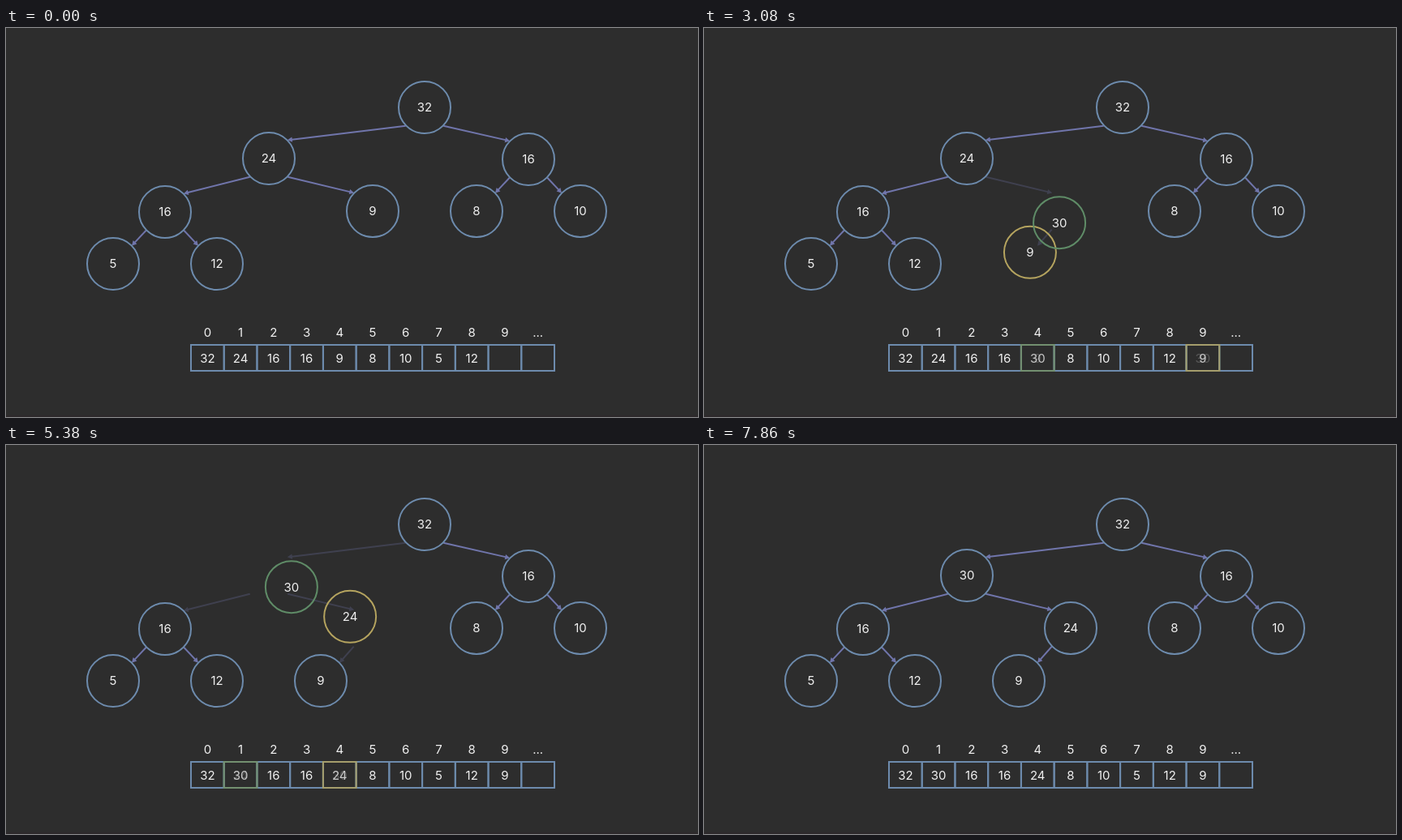
An HTML page that plays this animation: 853x480 px, repeating every 8590 ms.

```html
<!DOCTYPE html>
<html lang="en">
<head>
<meta charset="utf-8">
<title>Heap insertion</title>
<style>
  html, body { margin: 0; width: 100%; height: 100%; overflow: hidden; background: #2d2d2d; }
  svg { display: block; width: 853px; height: 480px; }
  text { font: 400 15px Inter, "Liberation Sans", sans-serif; fill: #f0f0f0; text-anchor: middle; }
  circle, rect { fill: none; stroke-width: 2; }
  .ask { word-spacing: -1.6px; }
  .arrow { stroke: #7075ab; stroke-width: 2; fill: #7075ab; }
  .arrow path { stroke: none; }
</style>
</head>
<body>
<svg id="stage" viewBox="0 0 853 480"></svg>
<script>
const LOOP = 8590, FRAME = 60;
const BLUE = '#6d8bad', GREEN = '#5f8c67', YELLOW = '#b5a45f';
const values = [32, 24, 16, 16, 9, 8, 10, 5, 12, 30];
const slots = [[516, 98], [324, 161], [644, 162], [196, 227], [452, 226],
  [580, 226], [708, 226], [132, 291], [260, 291], [388, 291]];
const asks = [['30 > 9 ?', 465.5, 291], ['30 > 24 ?', 373.8, 226], ['30 > 32 ?', 402.3, 161]];

// Each step is the state reached by the transition that begins at `at`.
const steps = [
  { at: 0 },
  { at: 600, green: 9 },
  { at: 1750, green: 9, yellow: 4, ask: 0 },
  { at: 2900, green: 4, yellow: 9, swap: [4, 9] },
  { at: 4050, green: 4, yellow: 1, ask: 1 },
  { at: 5200, green: 1, yellow: 4, swap: [1, 4] },
  { at: 6350, green: 1, yellow: 0, ask: 2 },
  { at: 7500, frames: 7 }
];
let order = values.map((_, i) => i);
steps.forEach((s, i) => {
  if (s.swap) {
    const [a, b] = s.swap;
    order = order.slice();
    [order[a], order[b]] = [order[b], order[a]];
  }
  s.order = order;
  s.count = i ? 10 : 9;
});

const stage = document.getElementById('stage');
function add(tag, attrs, parent = stage) {
  const el = document.createElementNS('http://www.w3.org/2000/svg', tag);
  for (const k in attrs) el.setAttribute(k, attrs[k]);
  parent.append(el);
  return el;
}
function label(str, x, y, parent) {
  const el = add('text', { x, y: y + 5.4 }, parent);
  el.textContent = str;
  return el;
}
const parentOf = i => (i - 1) >> 1;

add('rect', { y: 478, width: 853, height: 2, style: 'fill:#2d292b' });

const arrows = slots.map(([x, y], i) => {
  if (!i) return null;
  const [px, py] = slots[parentOf(i)];
  const dir = x < px ? -1 : 1;
  const x1 = px + dir * 23.3, y1 = py + 22.7;
  const x2 = x - dir * 23.3, y2 = y - 22.7;
  const angle = Math.atan2(y2 - y1, x2 - x1);
  const g = add('g', { class: 'arrow' });
  add('line', { x1, y1, x2: x2 - 3 * Math.cos(angle), y2: y2 - 3 * Math.sin(angle) }, g);
  add('path', {
    d: 'M0.5 0L-5.5 -3.2V3.2Z',
    transform: `translate(${x2} ${y2}) rotate(${angle * 180 / Math.PI})`
  }, g);
  return g;
});

const nodes = values.map(v => {
  const g = add('g', {});
  const ring = add('circle', { r: 32 }, g);
  label(v, 0, 0, g);
  return { g, ring };
});

const CELL = 448 / 11, LEFT = 228;
const cellX = i => LEFT + i * CELL;
const box = (i, stroke) => add('rect', { x: cellX(i), y: 391, width: CELL, height: 32, stroke });
for (let i = 0; i < 11; i++) {
  box(i, BLUE);
  label(i < 10 ? i : '...', cellX(i + 0.5), 376);
}
const greens = slots.map((_, i) => box(i, GREEN));
const yellows = slots.map((_, i) => box(i, YELLOW));
const cellTexts = slots.map((_, i) => [0, 1].map(() => label('', cellX(i + 0.5), 408)));

const askTexts = asks.map(a => {
  const el = label(...a);
  el.setAttribute('class', 'ask');
  return el;
});

const clamp = v => Math.min(1, Math.max(0, v));
const mix = (a, b, e) => a + (b - a) * e;
const colour = (s, i) => i === s.yellow ? YELLOW : i === s.green ? GREEN : BLUE;
const fade = (el, v) => el.setAttribute('opacity', v);

function draw(t) {
  const n = steps.findLastIndex(s => t >= s.at);
  const now = steps[n], old = steps[Math.max(0, n - 1)];
  const frame = Math.floor((t - now.at) / FRAME) + 1;
  const p = clamp(frame / (now.frames || 8));
  const e = 1 - Math.pow(1 - p, 2.2);
  // What leaves is gone before its replacement shows.
  const leave = 1 - clamp(e / 0.7), enter = clamp((e - 0.7) / 0.3);
  const presence = (before, after) => before ? (after ? 1 : leave) : (after ? enter : 0);

  nodes.forEach(({ g, ring }, id) => {
    const a = old.order.indexOf(id), b = now.order.indexOf(id);
    const x = mix(slots[a][0], slots[b][0], e), y = mix(slots[a][1], slots[b][1], e);
    g.setAttribute('transform', `translate(${x} ${y})`);
    const from = id < old.count ? colour(old, a) : colour(now, b);
    ring.style.stroke = `color-mix(in srgb, ${from}, ${colour(now, b)} ${e * 100}%)`;
    fade(g, presence(id < old.count, id < now.count));
  });

  arrows.forEach((g, i) => {
    if (!g) return;
    const redrawn = now.swap && (now.swap.includes(i) || now.swap.includes(parentOf(i)));
    fade(g, redrawn ? Math.max(leave, enter) : presence(i < old.count, i < now.count));
  });

  cellTexts.forEach(([was, is], i) => {
    const a = i < old.count ? values[old.order[i]] : '';
    const b = i < now.count ? values[now.order[i]] : '';
    was.textContent = a;
    is.textContent = b;
    fade(was, a === b ? 0 : 1 - e);
    fade(is, a === b ? 1 : e);
    fade(greens[i], mix(+(old.green === i), +(now.green === i), e));
    fade(yellows[i], mix(+(old.yellow === i), +(now.yellow === i), e));
  });

  askTexts.forEach((el, i) => fade(el, presence(old.ask === i, now.ask === i)));
}

const start = performance.now();
function tick() {
  draw((performance.now() - start) % LOOP);
  requestAnimationFrame(tick);
}
tick();
</script>
</body>
</html>
```
